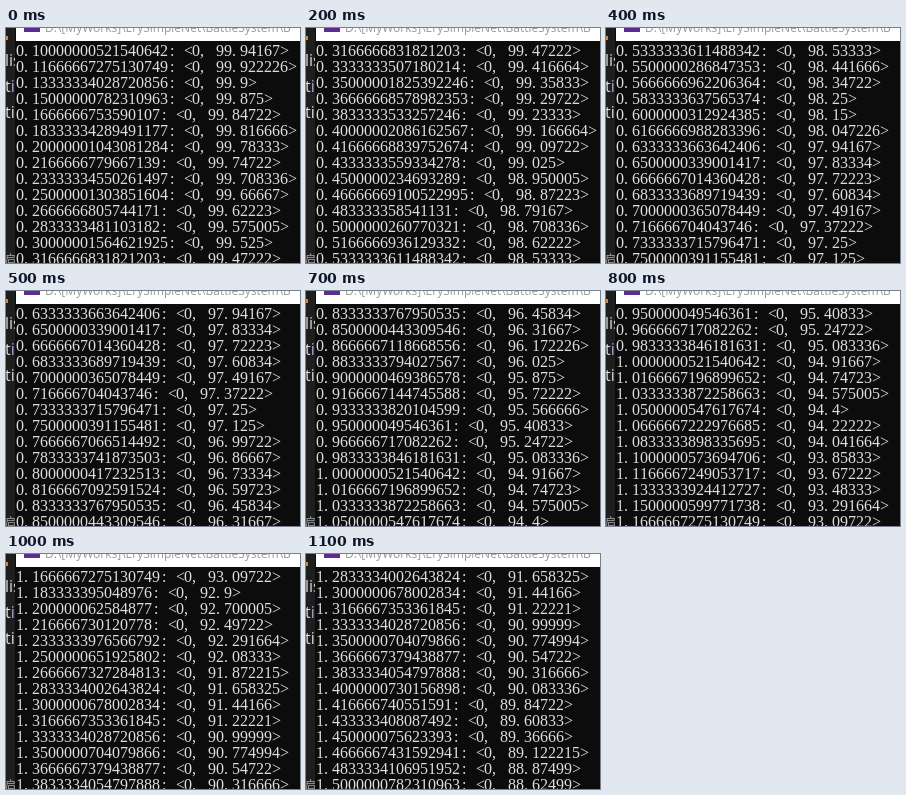
An HTML page that plays this animation: 294 by 235 pixels, repeating every 1200 ms.

```html
<!DOCTYPE html>
<html lang="en">
<head>
<meta charset="utf-8">
<title>Console log</title>
<style>
  html, body { margin: 0; width: 100%; height: 100%; overflow: hidden; background: #0c0c0c; }
  svg { display: block; width: 294px; height: 235px; }
  text { white-space: pre; }
  #log { font: 16px "Liberation Serif", serif; fill: #dedede; }
  .title { font: 12px "Open Sans", "Noto Sans", sans-serif; fill: #999; }
  .editor { font: 16px "Open Sans", "Noto Sans", sans-serif; fill: #dcdcdc; }
  .editor .small { font: 11px "Noto Sans CJK SC", "Noto Sans CJK", sans-serif; fill: #aaa; }
</style>
</head>
<body>
<svg viewBox="0 0 294 235">
  <rect width="294" height="235" fill="#1e1e1e"/>
  <g class="editor">
    <rect y="8" width="2" height="4" fill="#d08a3c"/>
    <text x="-1" y="38">lis</text>
    <text x="-1" y="64">t<tspan fill="#a9a9dc">i</tspan></text>
    <text x="-1" y="90">ti</text>
    <text class="small" x="-1" y="235">启</text>
  </g>
  <rect x="9" width="285" height="235" fill="#0c0c0c"/>
  <rect x="10" width="284" height="13" fill="#fff"/>
  <rect x="18" width="16" height="4" fill="#5c2d91"/>
  <text class="title" x="39" y="4">D:\[MyWorks]\ErySimpleNet\BattleSystem\B</text>
  <g id="log"></g>
</svg>
<script>
const LOOP = 1200, STEP = 100;
const ROWS = 14, CELL = 8, LINE = 16, LEFT = 10, BASELINE = 28;
const topLines = [6, 12, 19, 25, 32, 38, 44, 50, 57, 64, 70, 77];
const f32 = Math.fround;

// Shortest decimal that still reads back as the same 32-bit float.
function floatText(value) {
  for (let digits = 1; digits < 10; digits++) {
    const short = Number(value.toPrecision(digits));
    if (f32(short) === value) return String(short);
  }
  return String(value);
}

// A body falling from height 100 under gravity 10, stepped at 60 Hz.
function simulate(count) {
  const dt = f32(1 / 60), lines = [];
  let time = 0, speed = 0, height = 100;
  for (let i = 0; i <= count; i++) {
    lines.push(`${time}: <0, ${floatText(height)}>`);
    time += dt;
    speed = f32(speed - f32(10 * dt));
    height = f32(height + f32(speed * dt));
  }
  return lines;
}

// Each character sits in its own cell; the colon is centred in it.
function columns(line) {
  return [...line].map((char, i) => LEFT + i * CELL + (char === ":" ? 2 : 0)).join(" ");
}

const lines = simulate(topLines[topLines.length - 1] + ROWS);
const log = document.getElementById("log");

const rows = Array.from({ length: ROWS }, (_, i) => {
  const row = document.createElementNS("http://www.w3.org/2000/svg", "text");
  row.setAttribute("y", BASELINE + i * LINE);
  return log.appendChild(row);
});

let shown = -1;
function draw(ms) {
  const top = topLines[Math.floor((ms % LOOP) / STEP)];
  if (top === shown) return;
  shown = top;
  rows.forEach((row, i) => {
    const line = lines[top + i];
    row.setAttribute("x", columns(line));
    row.textContent = line;
  });
}

let start;
function tick(now) {
  start ??= now;
  draw(Math.max(0, now - start));
  requestAnimationFrame(tick);
}
draw(0);
requestAnimationFrame(tick);
</script>
</body>
</html>
```
